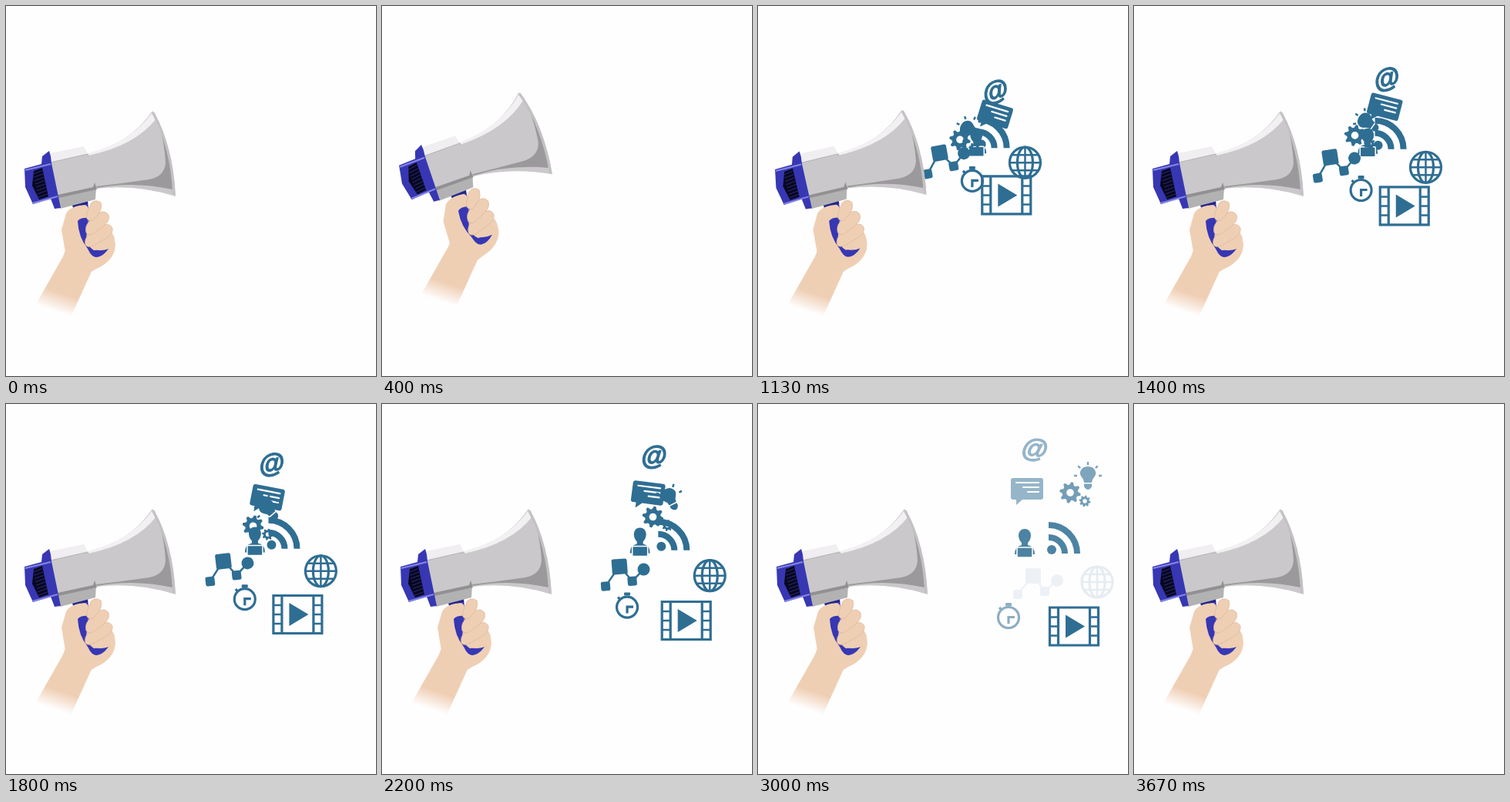
Write an HTML page that moves like this. It is 480 px wide and 480 px high and loops after 4070 ms.

```html
<!DOCTYPE html>
<html lang="en">
<head>
<meta charset="utf-8">
<title>Megaphone</title>
<style>
html, body { margin: 0; width: 100%; height: 100%; overflow: hidden; background: #fffeff; }
svg { display: block; width: 100vw; height: 100vh; }
.at { font: bold 34px "Liberation Sans", Arial, sans-serif; text-anchor: middle; stroke: #2f6e93; stroke-width: 1.3; }
.line { fill: none; stroke: #2f6e93; stroke-width: 3.2; }
.thin { stroke-width: 2.5; }
.thick { stroke-width: 8; }
.gap { fill: none; stroke: #fffeff; stroke-width: 2.2; stroke-linecap: round; }
</style>
</head>
<body>
<svg viewBox="0 0 480 480">
  <defs>
    <linearGradient id="fade" gradientUnits="userSpaceOnUse" x1="70" y1="372" x2="62" y2="396">
      <stop offset="0" stop-color="#efcfb4"/>
      <stop offset="1" stop-color="#efcfb4" stop-opacity="0"/>
    </linearGradient>
  </defs>
  <g id="icons" fill="#2f6e93"></g>

  <path id="arm" fill="url(#fade)" d="M78 314 L74 325 L36 392 L82 408 L112 342 L122 330 Z"/>

  <g id="horn">
    <!-- palm and grip -->
    <path fill="#3737b4" d="M85 254 L106 250 L108 280 H94 Z"/>
    <path fill="#25258a" d="M86 258 L106 253 V257 L87 262 Z"/>
    <path fill="#efcfb4" d="M72 290 L78 269 Q84 259 103 258 Q110 262 107 271 L108 290 L137 296 Q144 305 141 317 Q136 333 117 341 L109 346 L74 325 L77 320 Z"/>
    <path fill="#3737b4" d="M93 279 Q97 274 107 275 L104 302 Q106 312 114 317 L133 315 Q125 326 117 326 Q111 326 106 315 Q94 300 93 279 Z"/>
    <!-- fingers -->
    <g fill="#efcfb4" stroke="#dbb99e" stroke-width=".8">
      <path d="M110 313 Q107 306 114 302 L130 293 Q139 291 141 302 Q142 311 133 315 Q120 320 110 313 Z" stroke="none"/>
      <path d="M103 310 Q101 302 108 296 L126 285 Q134 281 138 288 Q139 295 132 300 L113 311 Q106 314 103 310 Z"/>
      <path d="M104 294 Q102 285 108 280 L120 269 Q128 264 133 271 Q135 279 127 285 L114 295 Q107 299 104 294 Z"/>
      <path d="M105 276 Q103 270 107 264 L110 256 Q116 250 123 255 Q125 263 120 270 L113 278 Q108 280 105 276 Z"/>
    </g>
    <!-- lower block and top rail -->
    <path fill="#b3b2b3" d="M67 247 L117 235 L116 251 L70 263 Z"/>
    <path fill="#f0eef0" d="M57 191 L101 182 L106 192 L58 204 Z"/>
    <!-- bell -->
    <path fill="#cac8ca" d="M57 203 L106 192 Q162 178 190 136 Q217 182 220 247 Q168 231 117 237 L66 249 Z"/>
    <path fill="#f2f0f2" d="M106 191 Q162 177 190 138 L195 146 Q168 181 107 194 Z"/>
    <path fill="#9b999b" d="M199 154 Q215 191 216 238 Q166 227 118 236 L117 234 Q151 230 186 225 Q206 221 207 203 Q206 181 199 154 Z"/>
    <path fill="none" stroke="#c3c1c3" stroke-width="3.4" d="M190.5 138 Q215 182 218 245"/>
    <path fill="#929092" d="M67 245 L113 235 L115 229 L118 238 L68 249 Z"/>
    <path fill="none" stroke="#b5b3b5" d="M58 203 L106 192 L107 195"/>
    <!-- back -->
    <path fill="#3737b4" d="M24 211 L46 205 L47 195 L56 188 L58 195 L59 204 L71 262 L63 263 L58 250 L35 257 L25 235 Z"/>
    <path fill="#08081c" d="M36 214 L47 210 L55 247 L43 251 L34 233 Z"/>
    <path id="grill" stroke="#2c2c8c" stroke-width=".9"/>
    <path stroke="#8686e4" stroke-width="2" d="M25 213 L58 205 M34 256 L67 247"/>
  </g>
</svg>
<script>
const $ = id => document.getElementById(id);
const LOOP = 4070, END = 3670, STEP = 200 / 3;
const BURST = 500, FLIGHT = 2500, FADE = 600, RAISE = 1200;
const MOUTH = [197, 184];

const line = (d, kind = '') => `<path class="line ${kind}" d="${d}"/>`;
const box = (x, y, s) => `<rect x="${x - s / 2}" y="${y - s / 2}" width="${s}" height="${s}" rx="2.5"/>`;

function gear(x, y, r) {
  let d = '';
  for (let i = 0; i < 32; i++) {
    const a = (i + .5) / 16 * Math.PI, q = i % 4 < 2 ? r : r * .74;
    d += `${i ? 'L' : 'M'}${x + q * Math.cos(a)} ${y + q * Math.sin(a)}`;
  }
  const h = r * .35;
  return `<path fill-rule="evenodd" d="${d}Z M${x - h} ${y}a${h} ${h} 0 1 0 ${2 * h} 0a${h} ${h} 0 1 0 ${-2 * h} 0Z"/>`;
}

function rays() {
  let d = '';
  for (let i = 0; i < 5; i++) {
    const a = Math.PI * (1 + i / 4), c = Math.cos(a), s = Math.sin(a);
    d += `M${c * 14} ${s * 14}L${c * 18} ${s * 18}`;
  }
  return line(d, 'thin');
}

function film() {
  let d = '';
  for (const y of [-12, 0, 12]) d += `M-31 ${y}h10M31 ${y}h-10`;
  return line('M-31.5 -24.5H31.5V24.5H-31.5ZM-20.5 -24V24M20.5 -24V24') + line(d, 'thin')
    + '<path d="M-11 -15L14 0L-11 15Z"/>';
}

// to: resting place, pace: how sharply x and y slow down, tilt: starting angle,
// gone: end of the fade, y0: starting height if not the mouth's
const ICONS = [
  { to: [396, 174], pace: [2.8, 0], y0: 161, gone: 3510,
    art: '<circle cx="-15" cy="15" r="6"/>' + line('M-19 -1A21 21 0 0 1 2 20M-19 -17A37 37 0 0 1 18 20', 'thick') },
  { to: [346, 180], pace: [3.2, 0], y0: 175, gone: 3510,
    art: `<path d="M-13 15Q-13 5 -4 3V0Q-8 -4 -8 -10Q-7 -18 0 -18Q7 -18 8 -10Q8 -4 4 0V3Q13 5 13 15Z"/>
      <rect x="-10" y="6" width="20" height="13" rx="1.5" stroke="#fffeff" stroke-width="1.5"/>` },
  { to: [349, 112], pace: [5, 3.2], tilt: 20, gone: 3300,
    art: `<path d="M-18 -16H18Q21 -16 21 -13V9Q21 12 18 12H-6L-14 19V12H-18Q-21 12 -21 9V-13Q-21 -16 -18 -16Z"/>
      <path class="gap" d="M-14 -10H15M-5 -4H15M1 2H15"/>` },
  { to: [428, 93], pace: [.8, .1], tilt: -75, gone: 3370,
    art: `<path d="M-5 9Q-5 5 -8 2Q-11 -2 -10 -5Q-8 -12 0 -12Q8 -12 10 -5Q11 -2 8 2Q5 5 5 9Z"/>
      <path d="M-5 10.5H5V14Q3 18 0 18Q-3 18 -5 14Z"/>` + rays() },
  { to: [405, 115], pace: [.6, -1.2], gone: 3400, art: gear(0, 0, 13.8) + gear(19, 11, 7.6) },
  { to: [364, 233], pace: [.3, .6], tilt: -12, gone: 3050,
    art: line('M-27 14L-7 -11L8 10L24 -4', 'thin') + box(-7, -10, 20) + box(-27, 14, 12) + box(8, 10, 12)
      + '<circle cx="24" cy="-4" r="8"/>' },
  { to: [359, 60], pace: [4.5, 3.2], tilt: -25, gone: 3300,
    art: '<text class="at" y="9" transform="rotate(6) skewX(-8)">@</text>' },
  { to: [325, 275], pace: [3.8, 1.9], gone: 3330,
    art: '<circle class="line" cy="2" r="13.5"/><rect x="-4" y="-17" width="8" height="4" rx="1"/>'
      + line('M0 10V1.5H8M-12 -11L-9 -8') },
  { to: [440, 231], pace: [3.6, 1.5], gone: 3070,
    art: '<circle class="line" r="20"/><ellipse class="line" rx="10" ry="20"/>'
      + line('M0 -20V20M-20 0H20M-17 -10H17M-17 10H17', 'thin') },
  { to: [410, 288.5], pace: [3.3, 3.3], gone: 3650, art: film() }
];

for (const icon of ICONS) {
  icon.el = document.createElementNS('http://www.w3.org/2000/svg', 'g');
  icon.el.innerHTML = icon.art;
  $('icons').append(icon.el);
}

let bars = '';
for (let i = 0; i < 8; i++) bars += `M${35 + i} ${218 + i * 4.3}L${47.5 + i} ${213.5 + i * 4.3}`;
$('grill').setAttribute('d', bars);

const clamp = v => Math.min(1, Math.max(0, v));
// Runs 0 to 1; a larger k starts faster and slows down more
const slow = (u, k) => k ? (1 - Math.exp(-k * u)) / (1 - Math.exp(-k)) : u;

function draw(ms) {
  const t = ms >= END ? END : Math.floor((ms + 4) / STEP) * STEP;

  // The arm lifts quickly and sinks back
  const lift = Math.sin(Math.PI * clamp(t / RAISE) ** .736);
  const shift = `translate(${13 * lift ** 4} ${-14 * lift ** 4})`;
  $('arm').setAttribute('transform', shift);
  $('horn').setAttribute('transform', `${shift} rotate(${-7.2 * lift} 90 330)`);

  const u = (t - BURST) / FLIGHT;
  for (const { el, to, pace, y0 = MOUTH[1], tilt = 0, gone } of ICONS) {
    const x = MOUTH[0] + (to[0] - MOUTH[0]) * slow(u, pace[0]);
    const y = y0 + (to[1] - y0) * slow(u, pace[1]);
    el.setAttribute('transform', `translate(${x} ${y}) rotate(${tilt * 1.14 * clamp(1 - u)})`);
    el.setAttribute('opacity', u < 0 ? 0 : clamp((gone - t) / FADE));
  }
}

const start = performance.now();
function tick() {
  draw((performance.now() - start) % LOOP);
  requestAnimationFrame(tick);
}
tick();
</script>
</body>
</html>
```
